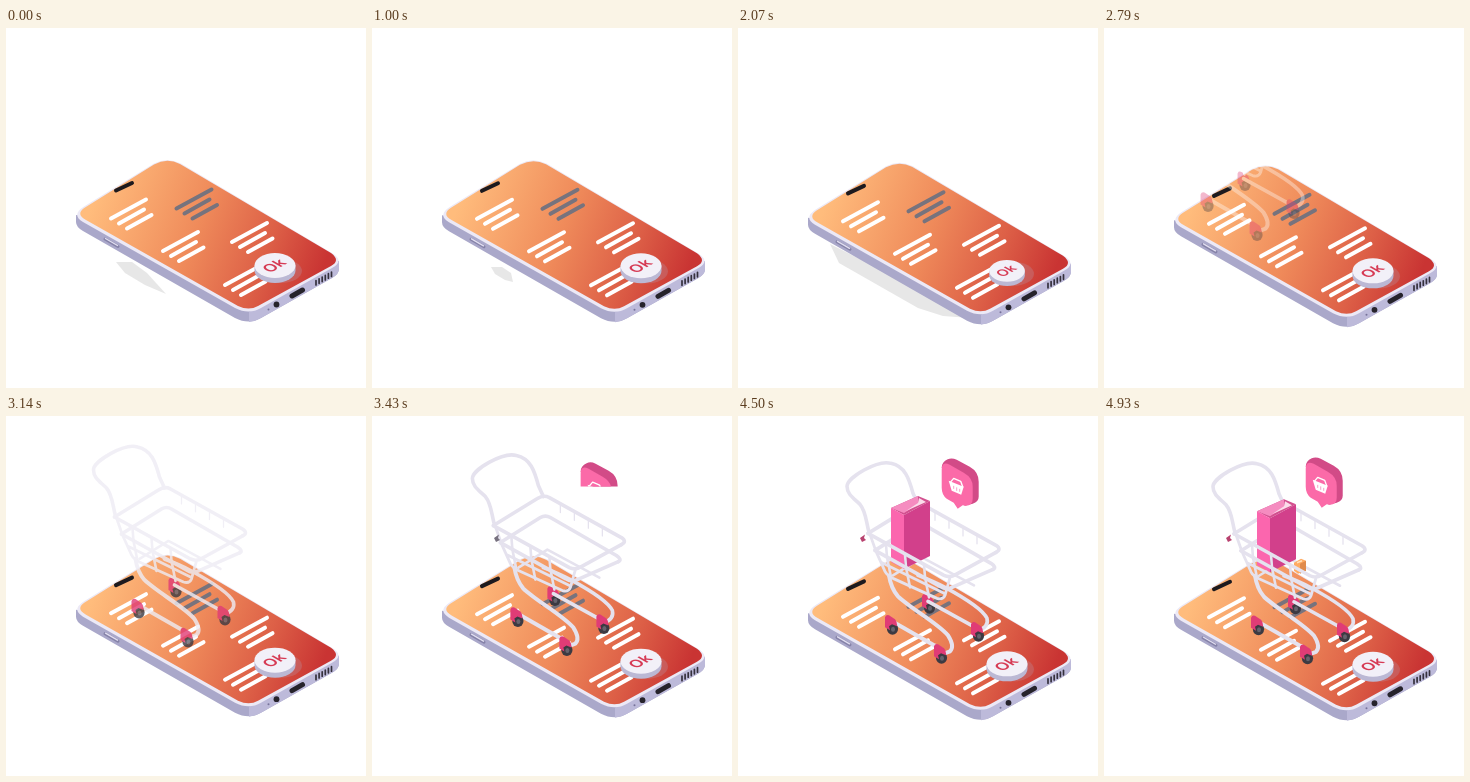
Write an HTML page that moves like this. It is 360 px wide and 360 px high and loops after 5000 ms.

```html
<!DOCTYPE html>
<html lang="en">
<head>
<meta charset="utf-8">
<title>Phone shop</title>
<style>
html, body { margin: 0; width: 100%; height: 100%; overflow: hidden; background: #fff; }
svg { display: block; width: 100vw; height: 100vh; }
.line { fill: none; stroke-linecap: round; stroke-linejoin: round; }
</style>
</head>
<body>
<svg viewBox="0 0 360 360">
  <defs>
    <linearGradient id="glow" gradientUnits="userSpaceOnUse" x1="88" y1="172" x2="310" y2="258">
      <stop offset="0" stop-color="#ffbc7c"/>
      <stop offset=".45" stop-color="#ef8a5a"/>
      <stop offset=".75" stop-color="#dd6047"/>
      <stop offset="1" stop-color="#c93433"/>
    </linearGradient>
    <g id="lines" class="line" stroke-width="4"><path d="M105 190.5L140 171.5M113 195.5L138 181.5M121 200.5L145.500 187"/></g>
    <g id="wheel">
      <ellipse cx="1.500" cy="4.500" rx="5.600" ry="6" fill="#3c3a42"/>
      <ellipse cx="2" cy="5" rx="2" ry="2.500" fill="#66636d"/>
      <path d="M-6 -7Q-5 -10 -2 -9L4 -5Q6 -3 6 2L1 0L-2 2L-1 6L-6 3Z" fill="#e03c76"/>
    </g>
    <clipPath id="wipe"><rect id="wipeBox" x="190" y="35" width="70" height="0"/></clipPath>
  </defs>

  <path id="shade" fill="#e7e7e7"/>

  <g id="phone">
    <path d="M70 187V194Q70 199 77 203L229 290Q243 297 255 290L326 250Q333 246 333 241V233Z" fill="#aaa8ca"/>
    <path d="M243 284V294Q250 293 255 290L326 250Q333 246 333 241V233Z" fill="#bdbada"/>
    <path d="M78 178.500L148 135.500Q161 128.500 175 135.500L326 225Q339 233 326 240L255 280Q243 287 229 280L77 194Q65 187 78 178.500Z" fill="#ece9f6"/>
    <path d="M79 179.500L148 136.500Q161 129.500 174 136L325 225Q335 232.500 325 238L252 278Q243 283 232 278L80 192Q69 186 79 179.500Z" fill="url(#glow)"/>
    <g class="line">
      <path d="M110 162.500L126 155" stroke="#1d1a1e" stroke-width="4"/>
      <path d="M99 211L112 218.500" stroke="#8582a8" stroke-width="3"/>
      <path d="M99.500 210.500L111.500 217.500" stroke="#e1def0" stroke-width="1.400"/>
      <path d="M286 268L296.500 262" stroke="#26232b" stroke-width="5"/>
      <path id="holes" stroke="#35313d" stroke-width="1.700"/>
    </g>
    <circle cx="270.500" cy="276.500" r="2.900" fill="#26232b"/>
    <circle cx="262.500" cy="281.500" r="1" fill="#76729a"/>
    <g id="texts"></g>
    <ellipse cx="275" cy="243" rx="21" ry="12" fill="#b98a98" opacity=".35"/>
    <g id="button">
      <path d="M-20.500 0V5A20.500 12.500 0 0 0 20.500 5V0Z" fill="#bbb8d4"/>
      <ellipse rx="20.500" ry="12.500" fill="#f2f0f8"/>
      <text transform="matrix(.866 -.5 .866 .5 -.7 .3)" x="0" y="5" text-anchor="middle" font-family="Inter, Arial, sans-serif" font-weight="600" font-size="15" fill="#d63a54">Ok</text>
    </g>
  </g>

  <g id="cart">
    <g class="line" stroke-width="3.600">
      <use href="#wheel" x="190" y="186" stroke="none"/>
      <path d="M190 184L239 211M180 158Q196 164 207 170Q244 190 249 201Q251 210 240 213"/>
      <path d="M131 115C128 104 128 94 122 87C116 81 109 77 109 69C109 60 140 42 153 46C167 49 171 61 175 76L180 87"/>
      <path d="M130 116L174 89Q180 85 186 88L258 128Q264 132 258 135"/>
      <path id="backWires" stroke-width="1.300"/>
      <path d="M137 133L177 108Q182 105 187 108L253 146Q259 150 255 152"/>
      <path d="M155 158L184 140L236 168" stroke-width="2.600"/>
    </g>
    <g id="bag">
      <path d="M153 95L180 83L192 88L166 102Z" fill="#d2508f"/>
      <path d="M153 95L180 83V91L166 100Z" fill="#f58cc0"/>
      <path d="M168 98L180 90L181 85L188 89Z" fill="#fbdcea"/>
      <path d="M153 95L166 102V156L153 149Z" fill="#fb66ae"/>
      <path d="M166 102L192 88V143L166 156Z" fill="#d2408b"/>
    </g>
    <g id="parcel">
      <path d="M-6 -3L1 -7L6 -5V5L-2 8L-6 5Z" fill="#ffab62"/>
      <path d="M0 -2L6 -5V5L0 8Z" fill="#e08a4c"/>
      <path d="M-3 -3L2 -5" stroke="#ffe0bd" stroke-width="1.500"/>
    </g>
    <g class="line" stroke-width="3.600">
      <path d="M130 116L206 158Q212 161 218 157L258 135"/>
      <path d="M137 133L202 169Q208 173 214 170L255 152"/>
      <path d="M132 117L138 134L147 154Q149 158 155 161L199 181Q205 183 207 178L212 160M143 145L206 176" stroke-width="2.800"/>
      <path id="frontWires" stroke-width="2.600"/>
      <path d="M151 158Q153 171 160 179C171 190 200 206 210 218Q217 229 212 234L204 237" stroke-width="4"/>
      <path d="M154 204L203 232" stroke-width="4"/>
    </g>
    <use href="#wheel" x="153" y="207"/>
    <use href="#wheel" x="202" y="236"/>
    <use href="#wheel" x="239" y="214"/>
  </g>

  <path id="grip" d="M122 122L127 118.500L126 122L128 124L124 126Z"/>

  <g id="bubble"><g clip-path="url(#wipe)">
    <path d="M206 53Q206 47 212 44.500Q216 42.500 221 45L234 52Q243 57 243 67V82Q243 87 237 89L229 91Z" fill="#d24b87"/>
    <path d="M206 55Q206 46 214 50L228 58Q237 63 237 72V84Q237 91 230 91L227 90.500L222 94L218 88L211 84Q206 80 206 73Z" fill="#fb6aa8"/>
    <path d="M213 66L228 72L225.500 80L216 76Z" fill="#fff"/>
    <path d="M215 67L218 63.500L225 66.500L227 72" class="line" stroke="#fff" stroke-width="1.400"/>
    <path d="M218 71V74M221 72.500V76M224 74V77" stroke="#f58abb" stroke-width=".8"/>
  </g></g>
</svg>
<script>
const LOOP = 5000, STEPS = 70;
const el = id => document.getElementById(id);
const clamp = x => Math.max(0, Math.min(1, x));
const ramp = (t, a, b) => clamp((t - a) / (b - a));
const smooth = p => (1 - Math.cos(Math.PI * p)) / 2;
const move = (id, x, y, more = '') => el(id).setAttribute('transform', `translate(${x} ${y})${more}`);
const show = (id, a) => el(id).setAttribute('opacity', a);
const repeat = (n, f) => Array.from({ length: n }, (_, i) => f(i)).join('');

el('texts').innerHTML = [[0, 0], [65.5, -10], [52, 32.5], [121, 23.5], [114, 66.5]]
  .map(([x, y], i) => `<use href="#lines" x="${x}" y="${y}" stroke="${i === 1 ? '#77737d' : '#fff'}"/>`).join('');
el('holes').setAttribute('d', repeat(6, i => `M${310 + i * 3.1} ${252.5 - i * 1.7}v4.5`));
el('backWires').setAttribute('d', repeat(4, i => `M${197 + i * 14} ${95 + i * 7.8}v8`));
el('frontWires').setAttribute('d', repeat(3, i => `M${148 + i * 19} ${127 + i * 10}l1 13l4 20`));

// Shadow outlines: [time, points]
const shades = [
  [500, [110, 234, 126, 234, 141, 245, 160, 266, 139, 257, 119, 245]],
  [1000, [119, 239, 130, 239, 139, 245, 141, 254, 133, 252, 123, 246]],
  [1300, [119, 239, 130, 239, 139, 245, 141, 254, 133, 252, 123, 246]],
  [2070, [92, 216, 150, 245, 232, 290, 205, 288, 180, 280, 101, 235]]
];
function shadeAt(t) {
  let i = 0;
  while (i < shades.length - 2 && t > shades[i + 1][0]) i++;
  const [a, p] = shades[i], [b, q] = shades[i + 1];
  const k = smooth(ramp(t, a, b));
  return 'M' + p.map((v, j) => v + (q[j] - v) * k).join(' ') + 'Z';
}

function draw(t) {
  const drift = 10.8 * smooth(ramp(t, 500, 5100));
  move('phone', 0, drift);

  el('shade').setAttribute('d', shadeAt(t));
  show('shade', 1 - ramp(t, 2200, 2600));

  const press = smooth(1 - clamp(Math.abs(t - 2070) / 320));
  move('button', 269, 237.5 + 2.5 * press, ` scale(${1 - 0.13 * press})`);

  const slide = -50 * Math.pow(Math.max(0, 4230 - t) / 1440, 3);
  const tint = ramp(t, 2860, 3300);
  move('cart', slide, slide * 0.59 + drift - 9);
  show('cart', ramp(t, 2500, 3300));
  el('cart').setAttribute('stroke', `rgb(${255 - 26 * tint},${255 - 29 * tint},${255 - 17 * tint})`);

  const drop = ramp(t, 4150, 4640);
  move('bag', 0, -35 * Math.pow(1 - drop, 2) - 1.5);
  show('bag', clamp(drop * 2));

  const pop = ramp(t, 4640, 4900);
  move('parcel', 196, 148, ` scale(${pop})`);
  el('parcel').setAttribute('stroke', 'none');

  show('grip', t >= 3350 ? 1 : 0);
  el('grip').setAttribute('fill', t < 3700 ? '#77717f' : '#b8426f');

  const dx = (4000 - t) * 0.0046;
  move('bubble', dx, dx * (t < 4000 ? 1 : 0.5));
  el('wipeBox').setAttribute('height', 60 * ramp(t, 3100, 3700));
}

// Only the cart frame inherits the tint
for (const node of document.querySelectorAll('#bag, #cart > use')) node.setAttribute('stroke', 'none');

const start = performance.now();
function tick() {
  const t = (performance.now() - start) % LOOP;
  draw(Math.min(STEPS - 1, Math.floor(t / LOOP * STEPS + 0.03)) * LOOP / STEPS);
  requestAnimationFrame(tick);
}
draw(0);
requestAnimationFrame(tick);
</script>
</body>
</html>
```
